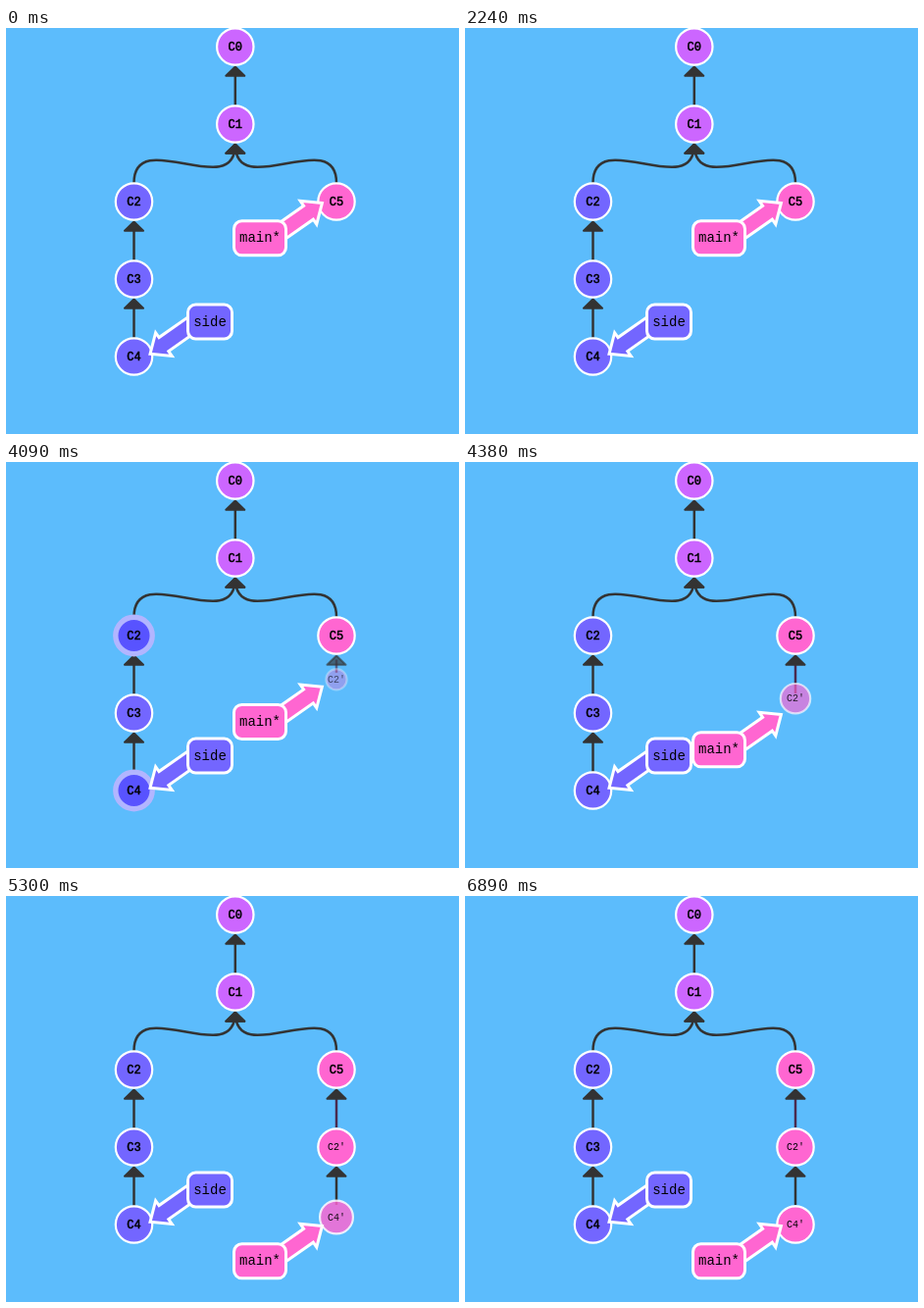
Write an HTML page with a canvas that moves like this. It is 462x414 px and loops after 8.3 s.

```html
<!DOCTYPE html>
<html lang="en">
<head>
<meta charset="utf-8">
<title>Commit graph</title>
<style>
  html, body { margin: 0; width: 100%; height: 100%; overflow: hidden; background: #5cbcfc; }
  canvas { display: block; }
</style>
</head>
<body>
<canvas id="stage" width="462" height="414"></canvas>
<script>
const ctx = document.getElementById('stage').getContext('2d');
const LOOP = 8300, ROW = 79, RADIUS = 18.7;
const DARK = '#333', PURPLE = '#cc66ff', PINK = '#ff66d1';
const VIOLET = [115, 102, 255], GLOW = [40, 48, 255], WHITE = [255, 255, 255];
const LEFT = 130.5, MID = 233.8, RIGHT = 337;
const rowY = row => 19 + row * ROW;

const clamp = n => Math.min(1, Math.max(0, n));
const progress = (t, start, length) => clamp((t - start) / length);
const rgb = c => `rgb(${c.map(Math.round)})`;
const mix = (a, b, k) => rgb(a.map((v, i) => v + (b[i] - v) * k));

// Cubic ease in and out, solved for time
function ease(n) {
  if (n <= 0 || n >= 1) return clamp(n);
  const q = 0.48 - n / 1.04, root = Math.sqrt(0.1734 + q * q);
  const k = Math.cbrt(root - q) + Math.cbrt(-root - q) + 0.5;
  return 3 * (1 - k) * k * k + k ** 3;
}

function bounce(n) {
  const s = 7.5625, p = 2.75;
  if (n < 1 / p) return s * n * n;
  if (n < 2 / p) return s * (n - 1.5 / p) ** 2 + 0.75;
  if (n < 2.5 / p) return s * (n - 2.25 / p) ** 2 + 0.9375;
  return s * (n - 2.625 / p) ** 2 + 0.984375;
}

function text(label, x, y, size, outline = 0) {
  ctx.font = `${size}px "Liberation Mono", "DejaVu Sans Mono", monospace`;
  ctx.textAlign = 'center';
  ctx.fillStyle = ctx.strokeStyle = '#000';
  ctx.fillText(label, x, y + size * 0.33);
  if (!outline) return;
  ctx.lineWidth = outline;
  ctx.strokeText(label, x, y + size * 0.33);
}

function circle(x, y, r, fill, stroke, width) {
  ctx.beginPath();
  ctx.arc(x, y, r, 0, Math.PI * 2);
  ctx.fillStyle = fill;
  ctx.fill();
  ctx.strokeStyle = stroke;
  ctx.lineWidth = width;
  ctx.stroke();
}

function commit(label, x, row, fill, stroke = '#fff', width = 2.2) {
  circle(x, rowY(row), RADIUS, fill, stroke, width);
  text(label, x, rowY(row), 12, 0.5);
}

function glowingCommit(label, row, glow) {
  commit(label, LEFT, row, mix(VIOLET, GLOW, glow), mix(WHITE, GLOW, glow), 2.2 + 8.8 * glow);
}

function newCommit(label, row, p) {
  if (p <= 0) return;
  ctx.globalAlpha = p * p;
  circle(RIGHT, rowY(row - 1 + p), RADIUS * p, PINK, '#fff', 2.2);
  ctx.globalAlpha = p;
  text(label, RIGHT, rowY(row - 1 + p), 10);
  ctx.globalAlpha = 1;
}

// Edge from a child's top up to the parent, ending in an arrowhead
function edge(x1, y1, x2, parentRow, color = DARK) {
  const y2 = rowY(parentRow) + 20.5;
  ctx.strokeStyle = color;
  ctx.lineWidth = 2.5;
  ctx.beginPath();
  ctx.moveTo(x1, y1);
  if (x1 === x2) ctx.lineTo(x2, y2 + 4);
  else ctx.bezierCurveTo(x1, y1 - 59, x2, y2 + 59, x2, y2);
  ctx.stroke();
  ctx.beginPath();
  ctx.moveTo(x2, y2);
  ctx.lineTo(x2 + 9.5, y2 + 9.3);
  ctx.lineTo(x2 - 9.5, y2 + 9.3);
  ctx.closePath();
  ctx.fillStyle = ctx.strokeStyle = DARK;
  ctx.lineWidth = 2;
  ctx.lineJoin = 'round';
  ctx.fill();
  ctx.stroke();
}

function newEdge(row, e, color) {
  if (e <= 0) return;
  ctx.globalAlpha = e;
  edge(RIGHT, rowY(row - 1) + 59 * e, RIGHT, row - 1, color);
  ctx.globalAlpha = 1;
}

function branch(label, x, y, width, height, tipX, tipY, angle, fill) {
  ctx.fillStyle = fill;
  ctx.strokeStyle = '#fff';
  ctx.lineWidth = 3;
  ctx.lineJoin = 'miter';
  ctx.save();
  ctx.translate(tipX, tipY);
  ctx.rotate(angle);
  ctx.beginPath();
  for (const [px, py] of [[0, 0], [-17, -14.5], [-17, -8.5], [-55, -8.5], [-55, 8.5], [-17, 8.5], [-17, 14.5]])
    ctx.lineTo(px, py);
  ctx.closePath();
  ctx.fill();
  ctx.stroke();
  ctx.restore();
  ctx.beginPath();
  ctx.roundRect(x - width / 2, y - height / 2, width, height, 8);
  ctx.fill();
  ctx.stroke();
  text(label, x, y - 0.5, 14);
}

function draw(t) {
  const settle = ease(progress(t, 3858, 400)), second = ease(progress(t, 4742, 400));
  const drop = (settle + second) * ROW;

  ctx.fillStyle = '#5cbcfc';
  ctx.fillRect(0, 0, 462, 414);

  edge(MID, rowY(1) - 19, MID, 0);
  edge(LEFT, rowY(2) - 19, MID, 1);
  edge(RIGHT, rowY(2) - 19, MID, 1);
  edge(LEFT, rowY(3) - 19, LEFT, 2);
  edge(LEFT, rowY(4) - 19, LEFT, 3);
  newEdge(3, settle, '#4a2b4f');
  newEdge(4, second);

  commit('C0', MID, 0, PURPLE);
  commit('C1', MID, 1, PURPLE);
  glowingCommit('C2', 2, ease(progress(t, 2225, 528)) - settle);
  commit('C3', LEFT, 3, rgb(VIOLET));
  glowingCommit('C4', 4, ease(progress(t, 3000, 528)) - settle);
  commit('C5', RIGHT, 2, PINK);
  newCommit("C2'", 3, bounce(progress(t, 3872, 800)));
  newCommit("C4'", 4, bounce(progress(t, 4750, 800)));

  const tilt = 35 * Math.PI / 180;
  branch('side', 208, 299.5, 45, 35, 147, 332.3, Math.PI - tilt, rgb(VIOLET));
  branch('main*', 259, 214.3 + drop, 53, 35, 322.4, 178.5 + drop, -tilt, PINK);
}

const begin = performance.now();
function tick() {
  draw((performance.now() - begin) % LOOP);
  requestAnimationFrame(tick);
}
tick();
</script>
</body>
</html>
```
